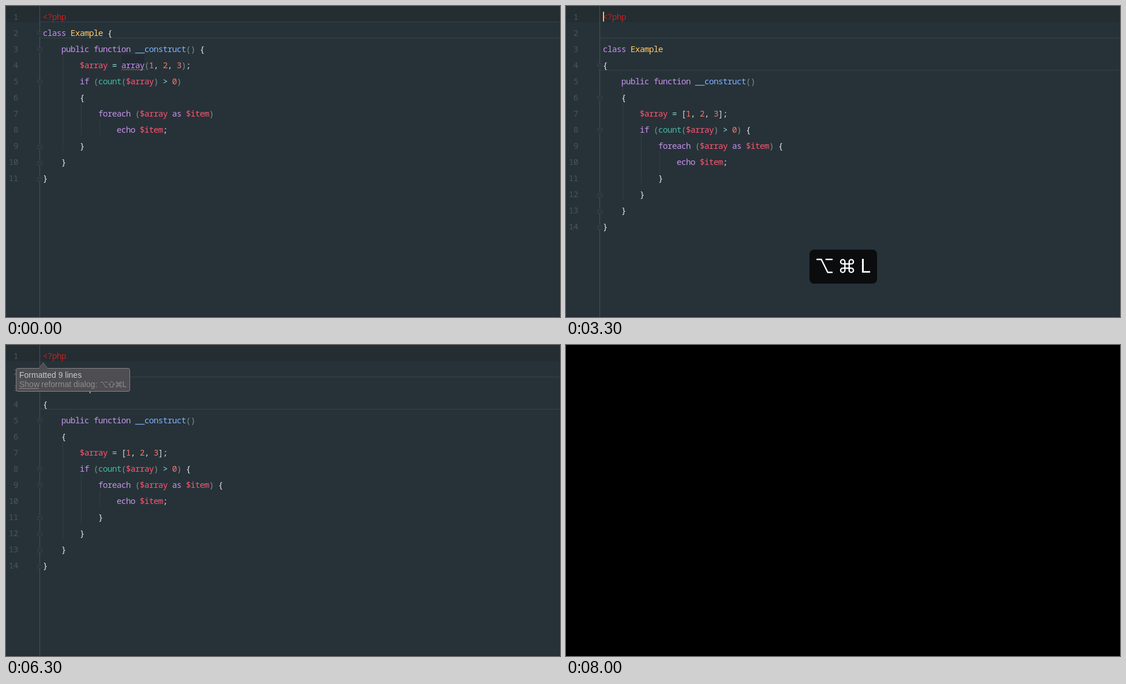
Recreate the animation shown at these times as an HTML page with a canvas. Size 960 by 540 pixels, loop 8.5 s.

```html
<!DOCTYPE html>
<html lang="en">
<head>
<meta charset="utf-8">
<title>Reformat code</title>
<style>
  html, body { margin: 0; width: 100%; height: 100%; overflow: hidden; background: #000; }
  canvas { display: block; width: 100%; height: 100%; }
</style>
</head>
<body>
<canvas id="stage" width="960" height="540"></canvas>
<script>
const ctx = document.getElementById('stage').getContext('2d');
const LOOP = 8500, STEP = 100;
const ROW = 28, CHAR = 8, LEFT = 64;
const MONO = '14.5px "Noto Sans Mono", "DejaVu Sans Mono", monospace';
const SANS = '"Liberation Sans", Arial, sans-serif';

// Guides are [x, top, bottom]; folds hold line numbers.
const before = {
  code: `<?php
class Example {
    public function __construct() {
        $array = array(1, 2, 3);
        if (count($array) > 0)
        {
            foreach ($array as $item)
                echo $item;
        }
    }
}`.split('\n'),
  separators: [27, 55],
  guides: [[98, 84, 252], [130, 168, 224], [162, 196, 224]],
  opens: [2, 3, 5], closes: [9, 10, 11],
  warning: true
};

const after = {
  code: `<?php

class Example
{
    public function __construct()
    {
        $array = [1, 2, 3];
        if (count($array) > 0) {
            foreach ($array as $item) {
                echo $item;
            }
        }
    }
}`.split('\n'),
  separators: [55, 111],
  guides: [[98, 140, 336], [130, 224, 308], [162, 252, 294]],
  opens: [4, 6, 8], closes: [12, 13, 14]
};

const refolded = {
  ...after,
  guides: [[98, 168, 336], [130, 224, 308], [162, 252, 280]],
  opens: [3, 5, 8, 9], closes: [11, 12, 13, 14]
};

const syntax = [
  [/^<\?php/, '#c4211f'],
  [/^\$\w+/, '#ff5370'],
  [/^(class|public|function|array|if|foreach|as|echo)\b/, '#c792ea'],
  [/^Example/, '#ffcb6b'],
  [/^__construct/, '#82b1ff'],
  [/^count/, '#45b8a2'],
  [/^\d/, '#f77669'],
  [/^[=>]/, '#89ddd8'],
  [/^[()]/, '#7c8f97'],
  [/^[{}]/, '#e8edef'],
  [/^./, '#cfd8dc']
];

const clamp = v => Math.max(0, Math.min(1, v));

function fillRect(color, x, y, w, h) {
  ctx.fillStyle = color;
  ctx.fillRect(x, y, w, h);
}

function stroke(points, color, width = 1, closed = false) {
  ctx.beginPath();
  points.forEach(([x, y]) => ctx.lineTo(x, y));
  if (closed) ctx.closePath();
  ctx.strokeStyle = color;
  ctx.lineWidth = width;
  ctx.stroke();
}

function text(string, x, y, font, color) {
  ctx.font = font;
  ctx.fillStyle = color;
  ctx.fillText(string, x, y);
}

// Places every character in its cell of the editor grid.
function gridText(string, x, y, color) {
  ctx.textAlign = 'center';
  [...string].forEach((c, i) => text(c, x + (i + 0.5) * CHAR, y, MONO, color));
  ctx.textAlign = 'left';
}

function codeLine(line, y) {
  for (let col = 0; col < line.length;) {
    const rest = line.slice(col);
    const [pattern, color] = syntax.find(([p]) => p.test(rest));
    const token = rest.match(pattern)[0];
    gridText(token, LEFT + col * CHAR, y, color);
    col += token.length;
  }
}

function fold(line, dir) {
  const y = line * ROW - 8 + (dir < 0 ? -0.5 : 0.5);
  const shape = [[54.5, y - 4 * dir], [62.5, y - 4 * dir], [62.5, y + dir], [58.5, y + 5 * dir], [54.5, y + dir]];
  ctx.fillStyle = '#263238';
  stroke(shape, '#43535a', 1, true);
  ctx.fill();
  stroke([[56.5, y - 0.5], [60.5, y - 0.5]], '#43535a');
}

function optionKey(x, y, w, h, color, width) {
  stroke([[x, y], [x + w * 0.3, y], [x + w * 0.7, y + h], [x + w, y + h]], color, width);
  stroke([[x + w * 0.56, y], [x + w, y]], color, width);
}

function commandKey(cx, cy, s, color, width) {
  ctx.save();
  ctx.translate(cx, cy);
  for (let i = 0; i < 4; i++) {
    stroke([[-2 * s, s], [2 * s, s]], color, width);
    ctx.beginPath();
    ctx.arc(2 * s, 2 * s, s, Math.PI, -Math.PI / 2, true);
    ctx.stroke();
    ctx.rotate(Math.PI / 2);
  }
  ctx.restore();
}

function shiftKey(cx, top, color) {
  stroke([[0, 0], [5.5, 5.5], [2.5, 5.5], [2.5, 10], [-2.5, 10], [-2.5, 5.5], [-5.5, 5.5]]
    .map(([x, y]) => [cx + x, top + y]), color, 1, true);
}

function editor(state, caret) {
  fillRect('#263238', 0, 0, 960, 540);
  fillRect('#232d32', 0, 0, 960, ROW);
  state.separators.forEach(y => fillRect('#35444a', 59, y, 901, 1));
  fillRect('#222c31', 0, 538, 960, 2);
  fillRect('#222c31', 959, 0, 1, 540);
  fillRect('#45545a', 58, 0, 1, 540);
  state.guides.forEach(([x, top, bottom]) => fillRect('#32403f', x, top, 1, bottom - top));
  if (state.warning) fillRect('#222b35', 200, 84, 40, ROW);
  state.opens.forEach(line => fold(line, 1));
  state.closes.forEach(line => fold(line, -1));

  state.code.forEach((line, i) => {
    const y = 24 + i * ROW;
    const number = String(i + 1);
    gridText(number, 21 - number.length * CHAR, y, '#46565d');
    codeLine(line, y);
  });
  if (state.warning) {
    const wave = Array.from({ length: 21 }, (_, i) => [200 + i * 2, i % 2 ? 109.5 : 111.5]);
    stroke(wave, '#a58a4c');
  }
  if (caret) fillRect('#ffcc00', 64, 10, 2, 17);
}

function shortcut(alpha) {
  ctx.globalAlpha = alpha;
  ctx.fillStyle = '#0b0c0d';
  ctx.beginPath();
  ctx.roundRect(422, 423, 117, 59, 8);
  ctx.fill();
  optionKey(434, 440, 28, 22.5, '#fff', 2.4);
  commandKey(487, 451.5, 3.7, '#fff', 2.4);
  text('L', 510, 463, `33px Inter, ${SANS}`, '#fff');
  ctx.globalAlpha = 1;
}

function balloon(alpha) {
  const gray = '#8d8e90';
  ctx.globalAlpha = alpha;
  ctx.beginPath();
  ctx.roundRect(17.5, 40.5, 197, 40, 3);
  ctx.fillStyle = '#4e4d51';
  ctx.strokeStyle = '#858688';
  ctx.lineWidth = 1;
  ctx.fill();
  ctx.stroke();
  stroke([[57, 40.5], [64.5, 30.5], [72, 40.5]], '#858688');
  ctx.fillStyle = '#4e4d51';
  ctx.fill();
  fillRect('#4e4d51', 58, 40, 13, 1);

  text('Formatted 9 lines', 23, 57, `14px ${SANS}`, '#c0cbce');
  text('Show', 23, 73, `14px ${SANS}`, gray);
  fillRect(gray, 23, 75, 34, 1);
  text('reformat dialog:', 61, 73, `14px ${SANS}`, gray);
  optionKey(164, 64.5, 12, 8.5, gray, 1);
  shiftKey(183, 63, gray);
  commandKey(195.5, 68.5, 1.6, gray, 1);
  text('L', 201.5, 73, `14px ${SANS}`, gray);
  ctx.globalAlpha = 1;
}

function caretVisible(t) {
  if (t >= 3200 && t < 4300) return true;
  const phase = t < 3200 ? t + 300 : t - 4300;
  return Math.floor(phase / 500) % 2 === 1;
}

function draw(t) {
  editor(t < 3300 ? before : t < 3500 ? after : refolded, caretVisible(t));
  const keys = Math.min(clamp((t - 2800) / 400), clamp((4600 - t) / 400));
  if (keys > 0) shortcut(keys);
  if (t >= 3500) balloon(clamp((t - 3400) / 200));
  const dark = clamp((t - 7500) / 500);
  if (dark > 0) fillRect(`rgba(0, 0, 0, ${dark})`, 0, 0, 960, 540);
}

const start = performance.now();
function tick() {
  const t = (performance.now() - start) % LOOP;
  draw(Math.floor(t / STEP) * STEP);
  requestAnimationFrame(tick);
}
tick();
</script>
</body>
</html>
```
